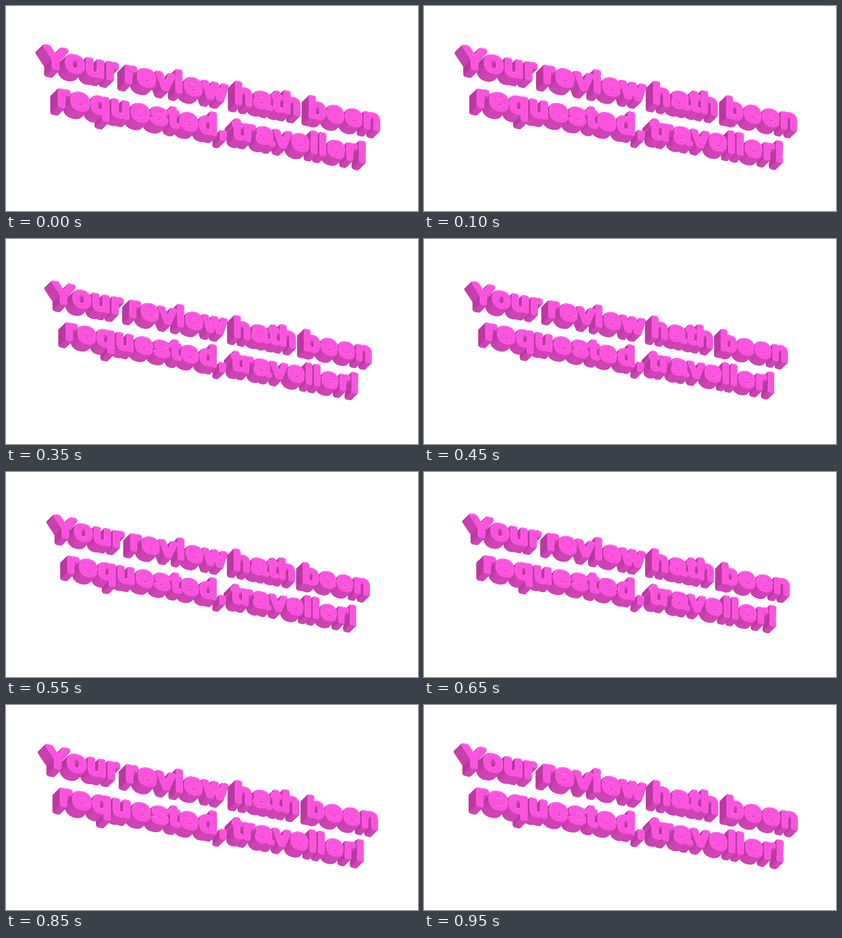
Recreate the animation shown at these times as an HTML page with a canvas. Size 600 by 300 pixels, loop 1 s.

```html
<!DOCTYPE html>
<html lang="en">
<head>
<meta charset="utf-8">
<title>Review request</title>
<style>
  html, body { margin: 0; width: 100%; height: 100%; overflow: hidden; background: #fff; }
  canvas { display: block; }
</style>
</head>
<body>
<canvas id="stage" width="600" height="300"></canvas>
<script>
const ctx = document.getElementById('stage').getContext('2d');
const SIZE = 44.5, SPACING = 3.3, WEIGHT = 6.8;
const SLOPE = 0.19, SQUASH = 0.9, PERSP = 0.00014;
const DEPTH = { x: -10.5, y: 10.3 }, LAYERS = 14;
const LEFT = '#b2389b', UNDER = '#d044b6';
const RIM = '#ea4ad0', SHINE = '#ff72ea', FACE = '#fc53df';

// word, left edge, baseline height at the centre
const words = [
  ['Your', -235.5, -15.6], ['review', -124.5, -15.6],
  ['hath', 34, -15.6], ['been', 144, -15.6],
  ['requested,', -217.5, 36.6], ['traveller!', 31.5, 36.6]
];

ctx.font = `${SIZE}px "Liberation Sans", Arial, sans-serif`;
ctx.lineJoin = ctx.lineCap = 'round';

const glyphs = words.flatMap(([word, left, base]) =>
  [...word].map((char, i) => {
    const end = ctx.measureText(word.slice(0, i + 1)).width;
    const x = left + end - ctx.measureText(char).width + i * SPACING;
    return { char, x, y: base + SLOPE * x };
  }));

function paint(zoom, color, weight, dx, dy) {
  ctx.fillStyle = ctx.strokeStyle = color;
  ctx.lineWidth = weight;
  for (const { char, x, y } of glyphs) {
    const q = 1 + PERSP * x;
    ctx.setTransform(
      zoom / q / q, zoom * (SLOPE / q - y * PERSP / q / q),
      0, zoom * SQUASH / q,
      300 + zoom * (x + dx) / q, 150 + zoom * (y + dy) / q);
    ctx.strokeText(char, 0, 0);
    ctx.fillText(char, 0, 0);
  }
}

function draw(ms) {
  const zoom = 0.9685 + 0.0315 * Math.cos(ms / 1000 * 2 * Math.PI);
  ctx.setTransform(1, 0, 0, 1, 0, 0);
  ctx.fillStyle = '#fff';
  ctx.fillRect(0, 0, 600, 300);

  // Sides: the left-shifted pass shades left walls, the lowered pass the undersides
  for (let i = LAYERS - 1; i >= 0; i--) {
    const x = DEPTH.x * i / LAYERS, y = DEPTH.y * i / LAYERS;
    paint(zoom, LEFT, WEIGHT, x + DEPTH.x / LAYERS, y);
    paint(zoom, UNDER, WEIGHT, x, y + DEPTH.y / LAYERS);
  }
  // Rounded front
  paint(zoom, RIM, WEIGHT, 0, 0);
  paint(zoom, SHINE, WEIGHT - 1.2, 0.1, -0.4);
  paint(zoom, FACE, WEIGHT - 2.2, 0.1, 0.2);
}

let last = -1;
function frame(now) {
  const step = Math.floor(now / 50) % 20;
  if (step !== last) draw((last = step) * 50);
  requestAnimationFrame(frame);
}
requestAnimationFrame(frame);
</script>
</body>
</html>
```
